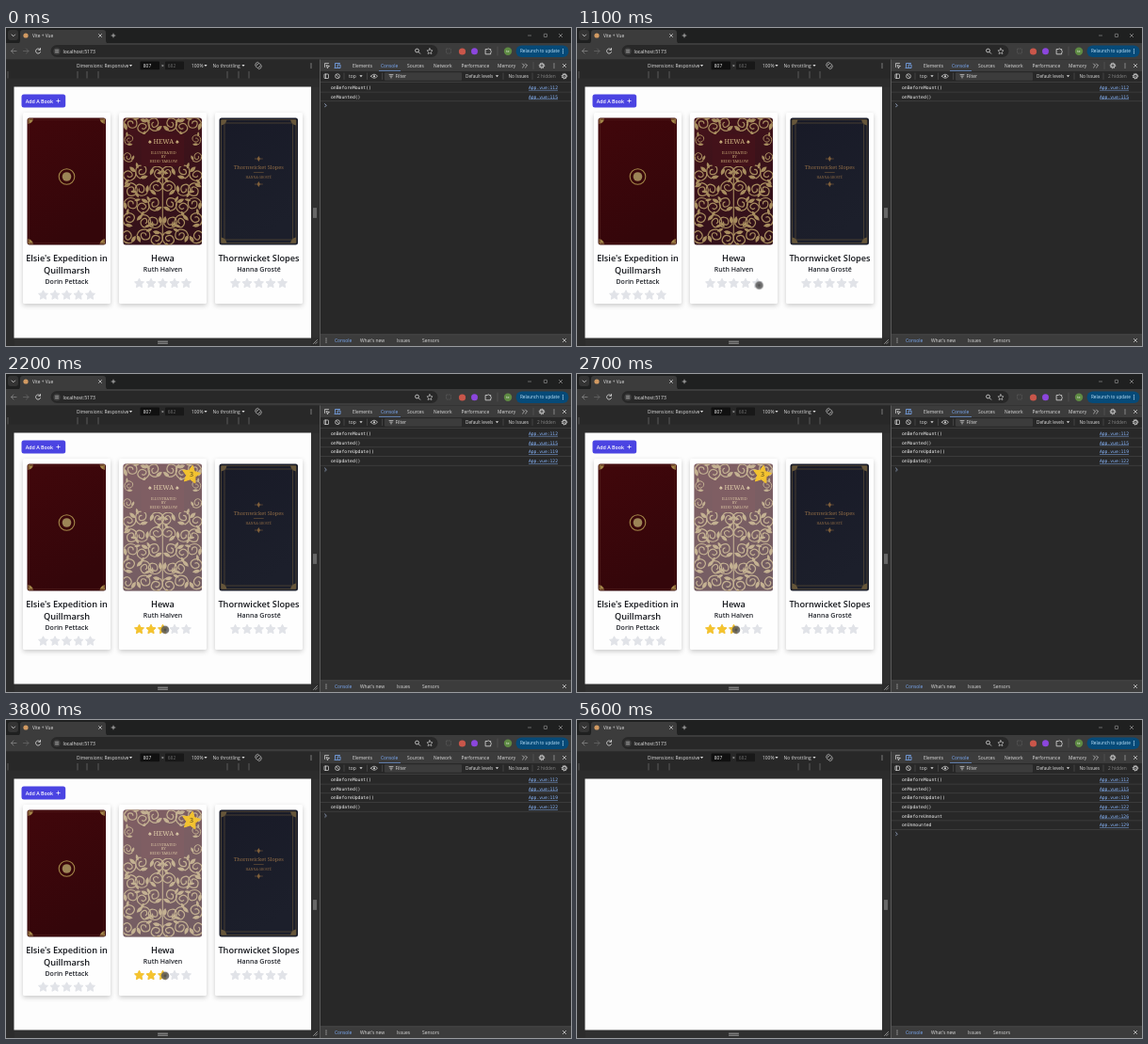
Write an HTML page that moves like this. It is 600 px wide and 338 px high and loops after 5700 ms.

```html
<!DOCTYPE html>
<html lang="en">
<head>
<meta charset="utf-8">
<title>Book list lifecycle</title>
<style>
  html, body { margin: 0; width: 600px; height: 338px; overflow: hidden; background: #282828; }
  svg { display: block; }
  text { font-family: "Open Sans", "Noto Sans", sans-serif; white-space: pre; }
  .mono { font-family: "DejaVu Sans Mono", monospace; }
  .serif { font-family: "Noto Serif", serif; }
  .line { fill: none; stroke-linecap: round; stroke-linejoin: round; }
  .card { filter: drop-shadow(0 2.5px 2.5px #0003); }
  .app, .updated, .unmounted, .prompt, .pointer, .dot, .press { animation: 5.7s step-end infinite; }
  .app { animation-name: app; }
  .updated { animation-name: updated; }
  .unmounted { animation-name: unmounted; }
  .prompt { animation-name: prompt; }
  .pointer { animation-name: move; animation-timing-function: ease-in-out; }
  .dot { animation-name: dot; }
  .press { animation-name: press; }
  @keyframes app { 0% { opacity: 1; } 82.4% { opacity: 0; } }
  @keyframes updated { 0% { opacity: 0; } 38.5% { opacity: 1; } }
  @keyframes unmounted { 0% { opacity: 0; } 82.4% { opacity: 1; } }
  @keyframes prompt {
    0% { transform: translateY(0); }
    38.5% { transform: translateY(19.4px); }
    82.4% { transform: translateY(38.8px); }
  }
  @keyframes move {
    0%, 13% { transform: translate(222px, 300px); }
    19%, 22% { transform: translate(193.5px, 273.5px); }
    31%, 100% { transform: translate(169px, 271.8px); }
  }
  @keyframes dot { 0% { opacity: 0; } 13.5% { opacity: 1; } 75.4% { opacity: 0; } }
  @keyframes press { 0% { opacity: 0; } 75.4% { opacity: .62; } 82.4% { opacity: 0; } }
</style>
</head>
<body>
<svg id="stage" width="600" height="338" viewBox="0 0 600 338"></svg>
<script>
const LIGHT = '#dedede', DIM = '#858585', BLUE = '#7cacf8', GOLD = '#a48749', LEAF = '#a88d5f';

const rect = (x, y, w, h, fill, r = 0, more = '') =>
  `<rect x="${x}" y="${y}" width="${w}" height="${h}" rx="${r}" fill="${fill}" ${more}/>`;
const circle = (x, y, r, fill, more = '') => `<circle cx="${x}" cy="${y}" r="${r}" fill="${fill}" ${more}/>`;
const line = (d, color = LIGHT, w = .8, more = '') =>
  `<path class="line" d="${d}" stroke="${color}" stroke-width="${w}" ${more}/>`;
const text = (x, y, s, size = 4.9, fill = LIGHT, more = '') =>
  `<text x="${x}" y="${y}" font-size="${size}" fill="${fill}" ${more}>${s}</text>`;
const mid = (x, y, s, size, fill, more = '') => text(x, y, s, size, fill, `text-anchor="middle" ${more}`);
const group = (cls, body) => `<g class="${cls}">${body}</g>`;
const at = (x, y, body, more = '') => `<g transform="translate(${x} ${y}) ${more}">${body}</g>`;

const caret = (x, y) => `<path d="M${x - 1.6} ${y - 1}h3.2l-1.6 2z" fill="${LIGHT}"/>`;
const dots = (x, y, c = LIGHT) => [-2, 0, 2].map(d => circle(x, y + d, .6, c)).join('');
const cross = (x, y, r = 1.7, c = LIGHT) =>
  line(`M${x - r} ${y - r}l${2 * r} ${2 * r}m0 ${-2 * r}l${-2 * r} ${2 * r}`, c, .7);
const plus = (x, y, r = 1.9, c = LIGHT) => line(`M${x - r} ${y}h${2 * r}M${x} ${y - r}v${2 * r}`, c, .7);
const gear = (x, y) => circle(x, y, 2.1, 'none', `stroke="${LIGHT}" stroke-width="1"`) +
  circle(x, y, 2.8, 'none', `stroke="${LIGHT}" stroke-width=".8" stroke-dasharray="1.1 1.1"`) + circle(x, y, .6, LIGHT);

function star(x, y, r, fill, turn = 0) {
  const pts = Array.from({ length: 10 }, (_, i) => {
    const a = (i * 36 - 90 + turn) * Math.PI / 180, k = i % 2 ? r * .5 : r;
    return `${(x + k * Math.cos(a)).toFixed(2)},${(y + k * Math.sin(a)).toFixed(2)}`;
  });
  return `<polygon points="${pts.join(' ')}" fill="${fill}" stroke="${fill}" stroke-width="1" stroke-linejoin="round"/>`;
}
const stars = (x, y, n, fill) =>
  Array.from({ length: n }, (_, i) => star(x + i * 12.5, y, 5.2, fill)).join('');

function browser() {
  const faint = '#a0a0a0';
  const toolbar = [
    line('M11 24.5h-5.5m2.5-2.5l-2.5 2.5 2.5 2.5', '#858585'),
    line('M18.5 24.5h5.5m-2.5-2.5l2.5 2.5-2.5 2.5', '#666'),
    line('M36.3 23a2.6 2.6 0 1 0 .3 2.5M36.5 21.5v1.8h-1.8'),
    circle(54, 24.7, 3.6, '#444'),
    line('M52.5 23.7h3M52.5 25.7h3', LIGHT, .6),
    circle(436.5, 24, 1.9, 'none', `stroke="${LIGHT}" stroke-width=".8"`), line('M438 25.5l1.7 1.7'),
    line('M450 21.7l.9 1.9 2.1.3-1.5 1.5.4 2.1-1.9-1-1.9 1 .4-2.1-1.5-1.5 2.1-.3z', LIGHT, .6),
    rect(467.5, 22, 5, 5, 'none', .5, 'stroke="#666" stroke-width=".7" stroke-dasharray="1 .8"'),
    circle(484.5, 25, 3.6, '#c9564a'),
    circle(497.5, 24.7, 3.5, '#8b46dc'),
    line('M509.5 22.5h1.8a1 1 0 0 1 1.9 0h1.5v1.7a1 1 0 0 1 0 1.9v1.7h-5.2z'),
    line('M522 20v9', '#555'),
    circle(533, 24.7, 4.2, '#5e8a43'), mid(533, 26, 'te', 3.6, '#fff'),
    rect(541.5, 18.5, 56, 12.5, '#064a78', 6.2),
    text(546, 26.4, 'Relaunch to update', 4.6, '#c2e7ff', 'font-weight="500"'), dots(591.5, 24.7, '#c2e7ff')
  ].join('');
  return rect(0, 0, 600, 17, '#1f2020') +
    rect(2, 2, 11, 11, '#343434', 3) + line('M6 7l1.8 1.8 1.8-1.8') +
    `<path d="M11 17q4 0 4-4V5q0-3 3-3h85q3 0 3 3v8q0 4 4 4z" fill="#3c3c3c"/>` +
    circle(21, 8, 2.6, '#d29a62') + text(28, 9.8, 'Vite + Vue', 4.8) + cross(100, 8, 1.5) + plus(114, 8) +
    line('M554.5 8h3', faint, .6) + rect(571.3, 6.3, 3.2, 3.2, 'none', .3, `stroke="${faint}" stroke-width=".6"`) +
    cross(589, 8, 1.6, faint) +
    rect(0, 16, 600, 17.5, '#3c3c3c') + rect(47.5, 18, 411, 13, '#282828', 6.5) +
    text(60.5, 26.5, 'localhost:5173', 5.1, '#ececec') + toolbar;
}

function deviceBar() {
  const ticks = [2, 76, 86, 98, 235, 247, 258].map(x => rect(x - .25, 46, .5, 7.5, '#8a8a8a')).join('');
  return rect(0, 33.5, 333, 12.5, '#282828') +
    text(75, 41.8, 'Dimensions: Responsive') + caret(132.5, 40) +
    rect(142.5, 35.5, 20.5, 8.8, '#101010', 1) + mid(150, 41.8, '807', 4.9, '#f0f0f0') + mid(166.5, 41.8, '×', 4.9, LIGHT) +
    rect(169, 35.5, 20, 8.8, '#181818', 1) + mid(176, 41.8, '682', 4.9, '#6c6c6c') +
    text(197, 41.8, '100%') + caret(212, 40) + text(219.5, 41.8, 'No throttling') + caret(252, 40) +
    rect(-1.6, -2.5, 3.2, 5, 'none', .5, `transform="translate(268 40) rotate(45)" stroke="${LIGHT}" stroke-width=".7"`) +
    line('M264.5 39.5q.2-3 3-3.3M271.5 40.5q-.2 3-3 3.3', LIGHT, .6) + dots(324, 40) +
    rect(0, 46, 333, 292, '#2c2c2c') + rect(0, 46, 333, 7.5, '#282828') + ticks +
    rect(324, 63, 8.5, 266, '#303030') + rect(9, 329.5, 315, 8.5, '#303030') +
    line('M327 191.5v10M329 191.5v10', '#bbb', .8) + line('M161.5 333.2h10M161.5 335.2h10', '#bbb', .8) +
    line('M326.5 335.5l4-4M328.8 335.5l1.7-1.7', '#bbb', .7) +
    rect(8.5, 62.5, 315.5, 267, '#fdfdfd') + rect(333, 33.5, 1, 304.5, '#5a5a5a');
}

function devtools() {
  const tabs = [[368, 'Elements'], [398, 'Console'], [426, 'Sources'], [454, 'Network'], [483.5, 'Performance'], [522, 'Memory']];
  const drawer = [[349, 'Console'], [376, "What's new"], [415, 'Issues'], [442, 'Sensors']];
  return rect(334, 33.5, 266, 304.5, '#282828') + rect(334, 33.5, 266, 12.5, '#3c3c3c') +
    line('M338.5 41.5v-4h4M340.5 39.5l3 1-1.4.5-.5 1.5z', LIGHT, .7) +
    line('M349.5 41.5v-4h5M352.5 39h2.5v3.5h-2.5zM349 42.5h2.5', BLUE, .8) +
    tabs.map(([x, s]) => text(x, 41.8, s, 4.9, s === 'Console' ? BLUE : LIGHT)).join('') +
    rect(396, 45.4, 23, .6, BLUE) + line('M548.5 38l2 2-2 2M551.5 38l2 2-2 2', LIGHT, .7) +
    line('M560 36.5v7', '#555') + gear(569, 40) + dots(582, 40) + cross(593, 40) +
    rect(338, 49, 4.5, 4.5, 'none', .5, `stroke="${LIGHT}" stroke-width=".7"`) + line('M339.5 49v4.5', LIGHT, .7) +
    circle(352, 51.2, 2.4, 'none', `stroke="${LIGHT}" stroke-width=".7"`) + line('M350.4 49.6l3.2 3.2', LIGHT, .7) +
    line('M359 48v6.5M383.5 48v6.5M399.5 48v6.5', '#555', .6) +
    text(364, 53, 'top') + caret(377, 51.3) +
    line('M387.5 51.2q3.5-4.2 7 0q-3.5 4.2-7 0z', LIGHT, .7) + circle(391, 51.2, 1, LIGHT) +
    rect(402, 47.2, 82, 8.5, '#3c3c3c', 1) + line('M407 49.6h4M407.8 51.2h2.4M408.6 52.8h.8', LIGHT, .7) + text(413.5, 53, 'Filter') +
    text(488, 53, 'Default levels', 4.7) + caret(521.5, 51.3) + line('M528 48v6.5M559 48v6.5', '#555', .6) +
    text(533.5, 53, 'No Issues', 4.8) + text(564, 53, '2 hidden', 4.8, DIM) + gear(593, 51.2) +
    rect(334, 57, 266, .6, '#4c4c4c') +
    rect(334, 325.8, 266, 12.2, '#3c3c3c') + rect(334, 325.5, 266, .6, '#555') + dots(340, 332) +
    drawer.map(([x, s], i) => text(x, 333.9, s, 4.9, i ? LIGHT : BLUE)).join('') + cross(593, 332);
}

function logs() {
  const rows = [['onBeforeMount()', 112], ['onMounted()', 115], ['onBeforeUpdate()', 119],
    ['onUpdated()', 122], ['onBeforeUnmount', 126], ['onUnmounted', 129]];
  const stage = ['', 'updated', 'unmounted'];
  return rows.map(([s, n], i) => {
    const y = 64.9 + i * 9.7;
    return group(stage[i >> 1], text(345, y, s, 4.75, '#f0f0f0', 'class="mono"') +
      text(586, y, `App.vue:${n}`, 4.7, '#8ab8ff', 'class="mono" text-anchor="end" text-decoration="underline"') +
      rect(334, y + 2.9, 266, .6, '#484848'));
  }).join('') + group('prompt', line('M338.5 80.6l1.7 1.7-1.7 1.7', '#a9bde0', .8));
}

const cover = (x, fill) => rect(x, 95.5, 83.5, 135, fill, 2.5);

// Repeats a drawing in the four corners of a cover.
const corners = (x, body) => [[x, 95.5, 1, 1], [x + 83.5, 95.5, -1, 1], [x, 230.5, 1, -1], [x + 83.5, 230.5, -1, -1]]
  .map(([cx, cy, sx, sy]) => at(cx, cy, body, `scale(${sx} ${sy})`)).join('');

function redCover(x) {
  return cover(x, 'url(#red)') + corners(x, `<path d="M1 1h5.5q-1 4.5-5.5 5.5z" fill="${GOLD}"/>`) +
    rect(x + 2, 97.5, 79.5, 131, 'none', 1, 'stroke="#54201c" stroke-width=".5"') +
    circle(x + 42, 158, 8.3, 'none', `stroke="${GOLD}" stroke-width="1.1"`) + circle(x + 42, 158, 4.8, '#9c8456');
}

function scrollCover(x) {
  const scroll = line('M0 7C9 7 12-4 5-7S-5-1 0 2 6-2 3-3', LEAF, 1.3) +
    `<path d="M0 7q-6 0-7-6 7 0 7 6zM7-2q5-1 5-6-5 1-5 6z" fill="${LEAF}"/>`;
  let half = '';
  for (let row = 0; row < 8; row++) {
    const inner = row === 1 || row === 2;
    for (let col = inner ? 2 : 0; col < 3; col++) {
      half += at(7 + col * 14, 103 + row * 17, scroll, `rotate(${(row * 70 + col * 125) % 360}) scale(${inner ? .7 : .92})`);
    }
  }
  const c = x + 41.8;
  return cover(x, 'url(#wine)') + '<g clip-path="url(#coverClip)">' + at(c, 0, half) + at(c, 0, half, 'scale(-1 1)') +
    line(`M${c} 150v74`, LEAF, 1.1) + '</g>' +
    rect(x + 19, 113, 45.5, 34, '#43121a', 1) +
    mid(c + 1, 122.5, '♠ HEWA ♠', 7, '#cdb27f', 'class="serif"') +
    [['ILLUSTRATED', 134], ['BY', 138.3], ['HEDD TARLOW', 142.8]]
      .map(([s, y]) => mid(c + 1, y, s, 4, '#c4a674', 'class="serif"')).join('');
}

function navyCover(x) {
  const c = x + 41.8;
  const frame = d => rect(x + d, 95.5 + d, 83.5 - 2 * d, 135 - 2 * d, 'none', 1, 'stroke="#5a4d36" stroke-width=".7"');
  const gem = y => `<path d="M${c} ${y - 3}l1.7 3-1.7 3-1.7-3z" fill="#80603a"/>` +
    line(`M${c - 4} ${y}h8`, '#80603a', .6);
  return cover(x, 'url(#navy)') + frame(2) + frame(5.5) +
    corners(x, `<path d="M2 2h6q-1 5-6 6z" fill="#66563a"/>`) + gem(139) +
    mid(c, 150, 'Thornwicket Slopes', 5.7, '#8f6b45', 'class="serif"') + line(`M${c - 5} 153.5h10`, '#80603a', .5) +
    mid(c, 160, 'HANNA GROSTË', 3.5, '#8a6844', 'class="serif"') + gem(166);
}

function app() {
  const title = (x, y, s) => mid(x, y, s, 9.2, '#15171c', 'font-weight="600"');
  const author = (x, y, s) => mid(x, y, s, 7, '#20232a', 'font-weight="600"');
  const cards = [18, 120, 222].map(x => rect(x, 90, 93, 203, '#fefefe', 1.5, 'class="card"')).join('');
  const gray = '#e1e3e8', yellow = '#f5c32d';
  return rect(16.5, 70.5, 46.7, 14, '#4b44e2', 2.5) +
    text(20.7, 79.5, 'Add A Book', 5.3, '#fff', 'font-weight="600"') + plus(55.5, 77.5, 1.7, '#fff') + cards +
    redCover(22.5) + scrollCover(124.5) + navyCover(226.5) +
    title(64.5, 248.2, "Elsie's Expedition in") + title(64.5, 260.7, 'Quillmarsh') + author(64.5, 271.5, 'Dorin Pettack') +
    title(166.5, 248.2, 'Hewa') + author(166.5, 259, 'Ruth Halven') +
    title(268.5, 248.2, 'Thornwicket Slopes') + author(268.5, 259, 'Hanna Grostë') +
    stars(39.5, 284, 5, gray) + stars(141.5, 271.5, 5, gray) + stars(243.5, 271.5, 5, gray) +
    group('updated', rect(124.5, 95.5, 83.5, 135, '#fff', 2.5, 'opacity=".32"') +
      star(196.5, 107, 10, '#f2c230', 10) + mid(197, 109, '3', 7, '#51421c') + stars(141.5, 271.5, 3, yellow));
}

const shade = (id, a, b) => `<linearGradient id="${id}" x2=".4" y2="1"><stop stop-color="${a}"/><stop offset="1" stop-color="${b}"/></linearGradient>`;

document.getElementById('stage').innerHTML =
  `<defs>${shade('red', '#41070b', '#34060a')}${shade('wine', '#45131a', '#32111a')}${shade('navy', '#181a27', '#1c1f2b')}
   <clipPath id="coverClip">${cover(124.5, '#000')}</clipPath></defs>` +
  browser() + deviceBar() + devtools() + logs() + group('app', app()) +
  group('pointer', group('dot', circle(0, 0, 4.3, '#5c5c5c', 'opacity=".85"') + circle(0, 0, 1.6, '#404040', 'opacity=".6"')) +
    group('press', circle(-1.8, 0, 4.2, '#b84050')));
</script>
</body>
</html>
```
